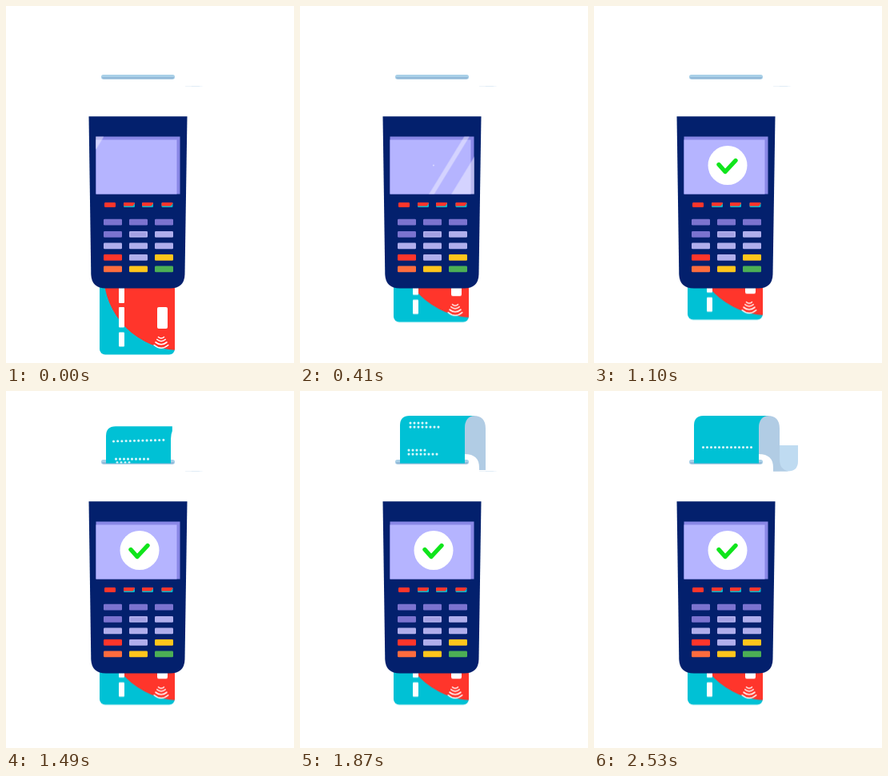
An HTML page for the animation above (2.57 s loop, 360 by 447 pixels).

```html
<!DOCTYPE html>
<html lang="en">
<head>
<meta charset="utf-8">
<title>Card payment</title>
<style>
  @property --len { syntax: "<length>"; inherits: true; initial-value: 0px; }

  html, body { margin: 0; width: 100%; height: 100%; overflow: hidden; background: #fff; }
  svg { display: block; width: 360px; height: 447px; animation: feed 2570ms infinite; }

  .card, .glare, .badge, .tick { animation: 2570ms infinite; }
  .card { animation-name: insert; }
  .glare { animation-name: sweep; }
  .badge { animation-name: pop; transform-origin: 167px 199.5px; }
  .tick { animation-name: draw; stroke-dasharray: 1 2; }

  /* --len is the length of paper printed so far */
  .sheet { transform: translateY(calc(60px - min(var(--len), 60px))); }
  .print { transform: translateY(calc(0px - var(--len))); }
  .corner { transform: translateX(clamp(0px, var(--len) - 45px, 14px)); }
  .drop { transform: translateY(clamp(0px, var(--len) - 60px, 70px)); }
  .lift { transform: translateY(calc(0px - max(0px, (var(--len) - 140px) * .71))); }

  @keyframes feed {
    0%, 42.8% { --len: 0px; animation-timing-function: cubic-bezier(.3, 0, .45, 1); }
    100% { --len: 186px; }
  }
  @keyframes insert {
    0% { transform: none; animation-timing-function: ease; }
    23.4%, 100% { transform: translateY(-43.7px); }
  }
  @keyframes sweep {
    0% { transform: none; animation-timing-function: linear; }
    23.4%, 100% { transform: translateX(214px); }
  }
  @keyframes pop {
    0%, 15.4% { transform: scale(0); animation-timing-function: ease; }
    28%, 100% { transform: none; }
  }
  @keyframes draw {
    0%, 28% { stroke-dashoffset: 1.2; animation-timing-function: ease-in-out; }
    40.5%, 100% { stroke-dashoffset: 0; }
  }
</style>
</head>
<body>
<svg viewBox="0 0 360 447">
  <defs>
    <clipPath id="cardShape"><rect x="117" y="296" width="94" height="140.5" rx="7"/></clipPath>
    <clipPath id="screen"><path d="M112.5 163.5H217.5V235.5H112.5Z"/></clipPath>
    <clipPath id="aboveSlot"><path d="M120 20H240V90.5H120Z"/></clipPath>
    <clipPath id="face"><path d="M125 31H206V90.5H125Z"/></clipPath>
    <clipPath id="cornerClip"><rect class="corner" x="100" y="0" width="106" height="200"/></clipPath>
    <clipPath id="dropClip"><rect class="drop" x="200" y="-69" width="60" height="100"/></clipPath>
    <clipPath id="liftClip"><rect class="lift" x="215" y="100.5" width="50" height="100"/></clipPath>
    <rect id="key" width="23" height="7.8" rx="1.3"/>
    <g id="softKey">
      <rect width="14" height="6" rx="1.3" fill="#00b8cc"/>
      <path d="M1.3 0H12.7Q14 0 14 1.3L11.5 4.4H0V1.3Q0 0 1.3 0Z" fill="#ff352b"/>
    </g>
  </defs>

  <g class="card">
    <g clip-path="url(#cardShape)">
      <path d="M117 296H211V437H117Z" fill="#00c1d5"/>
      <circle cx="218" cy="335" r="96" fill="#ff352b"/>
    </g>
    <g fill="#fff">
      <rect x="141" y="346" width="7" height="26" rx="1"/>
      <rect x="141" y="377" width="7" height="25.5" rx="1"/>
      <rect x="141" y="408.5" width="7" height="18" rx="1"/>
      <rect x="189" y="377" width="13" height="27" rx="2"/>
    </g>
    <path d="M190.5 414.5Q194 417.5 197.5 414.5M188.8 417.5Q194 422 199.2 417.5M187 421Q194 426.5 201 421M185.2 424.5Q194 432 202.8 424.5"
          fill="none" stroke="#fff" stroke-width="1.6" stroke-linecap="round"/>
  </g>

  <path d="M103.5 138.3H226.5L223.5 336Q223 353.5 205 353.5H125Q107 353.5 106.3 336Z" fill="#03206d"/>

  <g clip-path="url(#screen)">
    <path d="M112 163H218V236H112Z" fill="#8987e6"/>
    <path d="M112 167.5H213.5V236H112Z" fill="#b5b4ff"/>
    <g class="glare" fill="#fff" fill-opacity=".42">
      <path d="M87 163.5H122L78 235.5H43Z"/>
      <path d="M59 163.5H65.5L21.5 235.5H15Z"/>
    </g>
    <g class="badge">
      <circle cx="167" cy="199.5" r="24.5" fill="#fff"/>
    </g>
    <path class="tick" d="M156 198.5L164 207.5L177 193.5" pathLength="1" fill="none" stroke="#10e51c"
          stroke-width="5.4" stroke-linecap="round" stroke-linejoin="round"/>
  </g>

  <rect x="123" y="246" width="14" height="6" rx="1.3" fill="#ff352b"/>
  <use href="#softKey" x="147" y="246"/>
  <use href="#softKey" x="170" y="246"/>
  <use href="#softKey" x="194.5" y="246"/>

  <g fill="#7b73cf">
    <use href="#key" x="122" y="266.8"/><use href="#key" x="154" y="266.8"/><use href="#key" x="186" y="266.8"/>
    <use href="#key" x="122" y="282"/>
  </g>
  <g fill="#b0aeec">
    <use href="#key" x="154" y="282"/><use href="#key" x="186" y="282"/>
    <use href="#key" x="122" y="296.5"/><use href="#key" x="154" y="296.5"/><use href="#key" x="186" y="296.5"/>
    <use href="#key" x="154" y="311"/>
  </g>
  <path d="M155.5 283.5H175V288H155.5Z" fill="#a3a0e3"/>
  <use href="#key" x="122" y="311" fill="#ff352b"/>
  <use href="#key" x="186" y="311" fill="#ffc51c"/>
  <use href="#key" x="122" y="325.5" fill="#ff6c3e"/>
  <use href="#key" x="154" y="325.5" fill="#ffc51c"/>
  <use href="#key" x="186" y="325.5" fill="#4caf55"/>

  <rect x="119" y="86" width="92" height="5.6" rx="2.6" fill="#a9d0e8"/>
  <path d="M120 89H210Q210 91.6 208 91.6H122Q120 91.6 120 89Z" fill="#92b9d8"/>

  <g clip-path="url(#dropClip)">
    <path d="M206 47Q206 31 217 31Q232 31 232 47V100.5H224V96Q224 79 206 79Z" fill="#b1cce4"/>
  </g>
  <g clip-path="url(#liftClip)">
    <path d="M232 60H255V88Q255 100.5 242 100.5H232Z" fill="#bfdbf1"/>
    <path d="M224 100.5H243Q232 98 232 86Z" fill="#b1cce4"/>
  </g>

  <g clip-path="url(#aboveSlot)">
    <g clip-path="url(#cornerClip)">
      <path class="sheet" d="M125 160V43Q125 31 137 31H219Q206 31 206 47V160Z" fill="#00c1d5"/>
    </g>
  </g>
  <g clip-path="url(#face)">
    <g class="print" fill="none" stroke="#d9f6fa" stroke-width="3.1" stroke-linecap="round" stroke-dasharray="0 5">
      <path d="M134.5 109.8L197.5 108.2" stroke-dasharray="0 5.2"/>
      <path d="M137.5 132H178"/>
      <path d="M139 136.3H155"/>
      <path d="M138 168.2H159"/>
      <path d="M138 173.2H174"/>
      <path d="M136 202.2H157"/>
      <path d="M136 207.2H172"/>
      <path d="M136.5 256.3H197"/>
    </g>
  </g>
</svg>
</body>
</html>
```
